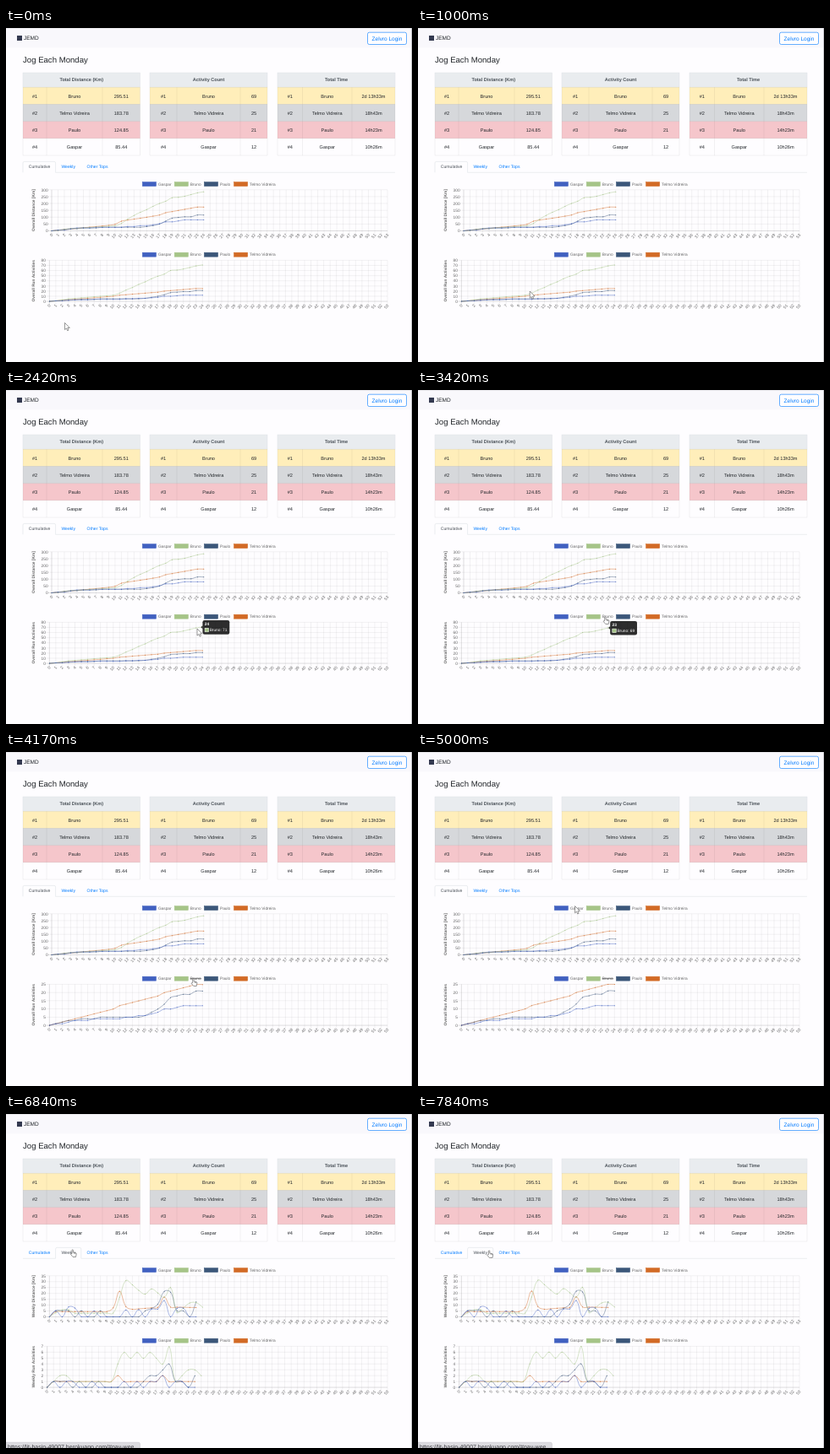
Write an HTML page that moves like this. It is 480x396 px and loops after 8 s.

```html
<!DOCTYPE html>
<html lang="en">
<head>
<meta charset="utf-8">
<title>Running dashboard</title>
<style>
html, body { margin: 0; width: 100%; height: 100%; overflow: hidden; background: #fefdff; }
svg { display: block; width: 100vw; height: 100vh; }
text { font-family: "Liberation Sans", Arial, sans-serif; text-rendering: geometricPrecision; white-space: pre; }
</style>
</head>
<body>
<svg viewBox="0 0 480 396"><g id="page"></g><g id="live"></g></svg>
<script>
const LOOP = 8000, UNIT = 1000 / 12, WEEKS = 25;
const INK = '#212529', BLUE = '#007bff', GREY = '#666', RULE = '#dee2e6';

const lerp = (a, b, p) => a + (b - a) * p;
const clamp = (v, a, b) => Math.min(b, Math.max(a, v));
const easeOut = p => 1 - (1 - clamp(p, 0, 1)) ** 4;

// Straight lines between key points [x, value, ...]
function between(x, points) {
  const n = clamp(points.findIndex(p => p[0] >= x), 1, points.length - 1);
  const a = points[n - 1], b = points[n], p = (x - a[0]) / (b[0] - a[0]);
  return a.slice(1).map((v, i) => lerp(v, b[i + 1], p));
}
const rounded = (x, points) => Math.round(between(x, points)[0]);

// runs(i): runs in week i; pace: key points of km per run
const runners = [
  { name: 'Gaspar', color: '#4060c0', legendX: 161.3, weeks: 24,
    runs: i => [1, 3, 4, 7, 12, 14, 16, 17, 18, 20, 21].includes(i) + (i === 18),
    pace: [[0, 5], [1, 5], [3, 8.5], [7, 5], [24, 8]] },
  { name: 'Bruno', color: '#a5c487', legendX: 199.2, weeks: 25,
    runs: i => i < 12 ? rounded(i, [[0, 0], [2, 2], [3, 2], [4, 1], [10, 1], [12, 6]])
      : i < 18 ? 6 - i % 2
      : rounded(i, [[18, 4], [19, 7], [20, 1], [22, 3], [23, 3], [24, 2]]),
    pace: [[0, 4], [2, 3], [10, 3.2], [12, 5.2], [13, 5.5], [14, 3.8], [18, 4.2], [19, 3.6], [24, 4.2]] },
  { name: 'Paulo', color: '#3b5679', legendX: 234.4, weeks: 24,
    runs: i => i < 15 ? +[1, 2, 3, 5, 8].includes(i)
      : rounded(i, [[15, 1], [16, 2], [17, 2], [19, 4], [20, 1], [21, 1], [22, 0], [23, 2]]),
    pace: [[0, 5.4], [15, 5], [16, 3.6], [18, 7.3], [19, 5.3], [21, 5], [23, 6.4]] },
  { name: 'Telmo Vidreira', color: '#d26a25', legendX: 269.5, weeks: 24,
    runs: i => (i > 0) + (i === 11 || i === 18),
    pace: [[0, 4.5], [9, 4.5], [11, 11], [13, 6.5], [18, 8.5], [23, 8]] }
];
const [gaspar, bruno, paulo, telmo] = runners;

const running = list => {
  let sum = 0;
  return Array.from({ length: WEEKS }, (_, i) => sum += list[i] || 0);
};
for (const r of runners) {
  r.weekRuns = Array.from({ length: r.weeks }, (_, i) => r.runs(i));
  r.weekKm = r.weekRuns.map((n, i) => n * between(i, r.pace)[0]);
  r.sumRuns = running(r.weekRuns);
  r.sumKm = running(r.weekKm);
}

const text = (x, y, s, size, fill = INK, more = '') =>
  `<text x="${x}" y="${y}" font-size="${size}" fill="${fill}" ${more}>${s}</text>`;
const rect = (x, y, w, h, fill, more = '') =>
  `<rect x="${x}" y="${y}" width="${w}" height="${h}" fill="${fill}" ${more}/>`;
const path = (d, more) => `<path d="${d}" ${more}/>`;
const MID = 'text-anchor="middle"', END = 'text-anchor="end"', BOLD = 'font-weight="bold"';

function table(cols, title, values) {
  const [a, b, c, d] = cols, top = 53, head = 17.3, row = 20.2;
  const fills = ['#ffeeba', '#d6d8db', '#f5c6cb', '#fefdff'];
  let out = rect(a, top, d - a, head, '#e9ecef', `stroke="${RULE}" stroke-width=".5"`) +
    text((a + d) / 2, 63.4, title, 5.55, '#495057', `${MID} ${BOLD}`);
  [bruno, telmo, paulo, gaspar].forEach((r, i) => {
    const y = top + head + i * row;
    out += rect(a, y, d - a, row, fills[i]) +
      path(`M${a} ${y}H${d}v${row}H${a}zM${b} ${y}v${row}M${c} ${y}v${row}`,
        'fill="none" stroke="#000" stroke-opacity=".12" stroke-width=".45"');
    [`#${i + 1}`, r.name, values[i]].forEach((s, j) =>
      out += text((cols[j] + cols[j + 1]) / 2, y + 12.2, s, 5.6, INK, MID));
  });
  return out;
}

function page() {
  return rect(0, 0, 480, 23.4, '#f9f8fc') + rect(0, 0, 480, .6, '#dddce1') + rect(479.4, 0, .6, 396, '#a9a8ad') +
    rect(13, 9, 6, 6, '#343a50') +
    text(21, 14.4, 'JEMD', 6.5) +
    rect(427.5, 5.2, 46, 14.3, '#fefdff', `rx="2" stroke="${BLUE}" stroke-width=".6"`) +
    text(450.5, 14.6, 'Zelvro Login', 6.5, BLUE, MID) +
    text(20, 41.4, 'Jog Each Monday', 9.6) +
    table([20, 48, 114, 158.5], 'Total Distance (Km)', ['295.51', '183.78', '124.85', '85.44']) +
    table([170, 202, 277, 309], 'Activity Count', [69, 25, 21, 12]) +
    table([321, 350.5, 409, 460], 'Total Time', ['2d 13h33m', '18h43m', '14h23m', '10h26m']);
}

function tabs(weekly, hover) {
  const [x, w] = weekly ? [58.6, 30.2] : [20, 38.6];
  return path(`M20 171.3H${x}V160q0-1.6 1.6-1.6h${w - 3.2}q1.6 0 1.6 1.6V171.3H460`,
      `fill="none" stroke="${RULE}" stroke-width=".6"`) +
    text(26.8, 166.4, 'Cumulative', 5.12, weekly ? BLUE : '#495057') +
    text(65.4, 166.4, 'Weekly', 5.12, weekly ? '#495057' : hover ? '#0056b3' : BLUE) +
    text(95.6, 166.4, 'Other Tops', 5.12, BLUE);
}

// Smooth curve whose handles stay inside the plot
function curve(pts, top, base) {
  const y = v => clamp(v, top, base), f = v => v.toFixed(2);
  const handles = pts.map((p, i) => {
    const a = pts[i - 1] || p, b = pts[i + 1] || p;
    const da = Math.hypot(p[0] - a[0], p[1] - a[1]), db = Math.hypot(b[0] - p[0], b[1] - p[1]);
    const ka = .4 * da / (da + db), kb = .4 * db / (da + db), dx = b[0] - a[0], dy = b[1] - a[1];
    return [p[0] - ka * dx, y(p[1] - ka * dy), p[0] + kb * dx, y(p[1] + kb * dy)];
  });
  return pts.map((p, i) => i
    ? 'C' + [handles[i - 1][2], handles[i - 1][3], handles[i][0], handles[i][1], ...p].map(f).join(' ')
    : 'M' + p.map(f).join(' ')).join('');
}

const RIGHT = 451, HEIGHT = 48.7, TOP1 = 191.8, TOP2 = 275.4;
const leftOf = max => 46 + 2.67 * String(max).length;

// scale(v) gives the drawn height of a value as a share of the plot
function chart({ top, title, key, max, step, scale = v => v / max, hidden }) {
  const base = top + HEIGHT, left = leftOf(max), dx = (RIGHT - left) / 53;
  let out = '', grid = '';
  for (let v = 0; v <= max; v += step) {
    const y = base - v / max * HEIGHT;
    if (v) grid += `M${left - 4} ${y}H${RIGHT}`;
    out += text(left - 4.4, y + 1.7, v, 4.8, GREY, END);
  }
  for (let i = 0; i < 54; i++) {
    const x = left + i * dx;
    if (i) grid += `M${x} ${top}V${base + 4}`;
    out += text(0, 1.6, i, 4.8, GREY, `${END} transform="translate(${x + .4} ${base + 4}) rotate(-50)"`);
  }
  out = path(grid, 'stroke="#000" stroke-opacity=".1" stroke-width=".5"') +
    path(`M${left - 4} ${base}H${RIGHT}M${left} ${top}V${base + 4}`, 'stroke="#000" stroke-opacity=".25" stroke-width=".5"') + out +
    text(0, 0, title, 4.8, GREY, `${MID} ${BOLD} transform="translate(34.4 ${base - HEIGHT / 2}) rotate(-90)"`);

  for (const r of runners) {
    const x = r.legendX, y = top - 9.2;
    out += rect(x, y, 16.2, 5, r.color, `stroke="${r.color}" stroke-width=".5"`) +
      text(x + 18.6, y + 4.2, r.name, 4.8, GREY);
    if (r === hidden) out += rect(x + 18.4, y + 2.1, 13.2, .8, GREY);
  }
  for (const r of [...runners].reverse()) {
    if (r === hidden) continue;
    const pts = r[key].map((v, i) => [left + i * dx, base - scale(v) * HEIGHT]);
    const dots = pts.map(p => `M${p[0] - .5} ${p[1]}a.5.5 0 1 0 1 0a.5.5 0 1 0-1 0`).join('');
    out += path(curve(pts, top, base), `fill="none" stroke="${r.color}" stroke-width=".5" stroke-opacity=".88"`) +
      path(dots, `fill="${r.color}"`);
  }
  return out;
}

// The box trails the pointer along the line, then settles on week 23
function tooltip(k) {
  const pos = k < 16 ? clamp(15 + (k - 9) * 2.9, 15, 24) : 23;
  const week = k < 16 ? Math.min(24, Math.round(pos + .9)) : 23;
  const i = Math.floor(pos), sums = bruno.sumRuns, left = leftOf(80);
  const value = lerp(sums[i], sums[Math.min(24, i + 1)], pos - i);
  const x = left + pos * (RIGHT - left) / 53 + 2.4, y = TOP2 + HEIGHT * (1 - value / 80) - 8.2;
  return `<g opacity="${k < 18 ? 1 : .6}">` +
    rect(x, y, 31.8, 16.6, '#000', 'rx="2.2" fill-opacity=".82"') +
    path(`M${x} ${y + 6.2}l-2 2 2 2z`, 'fill-opacity=".82"') +
    text(x + 2.4, y + 6.2, week, 4.8, '#fff', BOLD) +
    rect(x + 2.6, y + 9.2, 4.6, 4.6, bruno.color, 'stroke="#fff" stroke-width=".5"') +
    text(x + 8.2, y + 13.3, `${bruno.name}: ${sums[week]}`, 4.8, '#fff') + '</g>';
}

// Pointer stops: tick, x, y
const route = [[0, 69.5, 349.5], [2, 42.5, 330], [4, 174, 310], [6, 90.5, 314], [9, 179.5, 296.5], [12, 226, 283],
  [17, 219, 268.5], [22, 219, 268.5], [23, 213, 35.5], [24, 222, 190], [28, 76.3, 160.5], [36, 76.3, 160.5],
  [38, 203.5, 224], [39, 81.7, 161.5]];

function cursor(k) {
  const [x, y] = between(k, route);
  const onLegend = x > 160 && y > 264 && y < 272, onTab = x < 121 && y > 158 && y < 171;
  const shape = onLegend || onTab
    ? 'M1.7 5.2V1q.1-.7.7-.7T3.1 1V3.6l2.9.5q1 .3.9 1.3L6.2 9H2.8L.3 6q-.1-.9.7-.9zM4.4 4v1.3M5.7 4.2v1.2'
    : 'M0 0V8.2L1.9 6.5 3.1 9.3 4.5 8.7 3.3 6H5.8Z';
  return path(shape, `transform="translate(${x} ${y})" fill="#fff" stroke="#555" stroke-width=".6" stroke-linejoin="round"`);
}

function draw(k) {
  const weekly = k >= 31, toggled = k >= 18;
  let out = tabs(weekly, k >= 28);
  if (weekly) {
    const grow = easeOut((k - 30.5) / 5);
    const weeklyChart = (top, title, key, max, step) =>
      chart({ top, title, key, max, step, scale: v => v / max * grow });
    out += weeklyChart(TOP1, 'Weekly Distance [Km]', 'weekKm', 35, 5) +
      weeklyChart(TOP2, 'Weekly Run Activities', 'weekRuns', 7, 1);
  } else {
    const p = easeOut((k - 17.5) / 5);
    out += chart({ top: TOP1, title: 'Overall Distance [Km]', key: 'sumKm', max: 300, step: 50 }) +
      chart({ top: TOP2, title: 'Overall Run Activities', key: 'sumRuns',
        max: toggled ? 25 : 80, step: toggled ? 5 : 10,
        scale: v => lerp(v / 80, v / 25, p), hidden: toggled && bruno });
  }
  if (k >= 8 && k <= 18) out += tooltip(k);
  if (k >= 30) out += path('M0 389.3H156.5q2 0 2 2V396H0z', 'fill="#dcdbe0" stroke="#c4c3c9" stroke-width=".5"') +
    text(2, 397, 'https://lit-basin-49007.herokuapp.com/#nav-wee', 7, '#3c3c42');
  return out + cursor(k);
}

document.getElementById('page').innerHTML = page();
const live = document.getElementById('live');
const start = performance.now();
let shown = -1;

// The screen moves in 5 ticks a second, shown on a 12 Hz clock
function frame() {
  const unit = Math.floor(((performance.now() - start) % LOOP + .5) / UNIT);
  const k = Math.min(39, Math.floor((unit + .5) / 2.4));
  if (k !== shown) live.innerHTML = draw(shown = k);
  requestAnimationFrame(frame);
}
frame();
</script>
</body>
</html>
```
